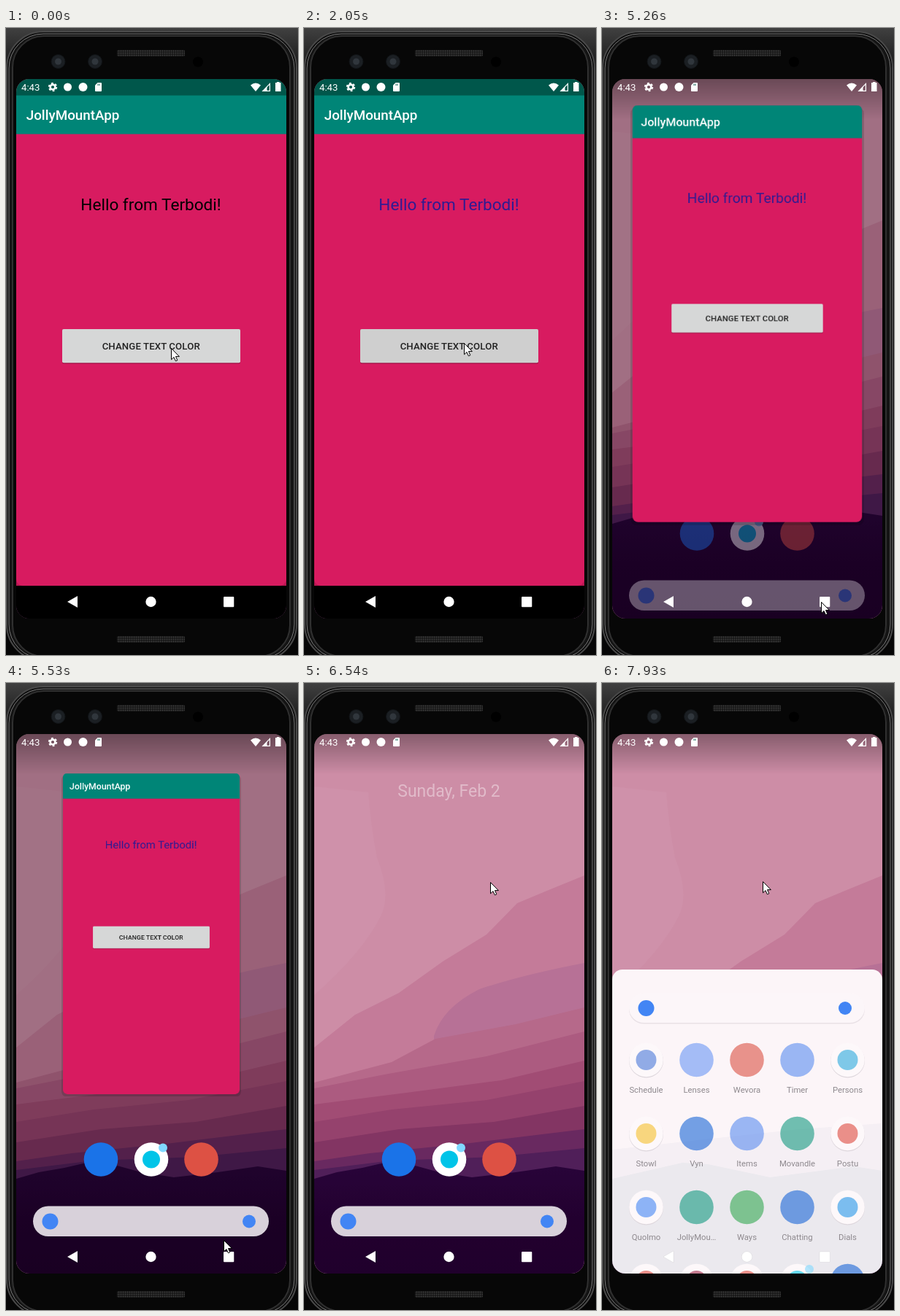
These frames come from a looping animation (400x860 px, 8000 ms). An HTML page:

```html
<!DOCTYPE html>
<html lang="en">
<head>
<meta charset="utf-8">
<title>Text color demo</title>
<style>
html, body { margin: 0; width: 100%; height: 100%; overflow: hidden; background: #000; }
svg { display: block; width: 400px; height: 860px; font-family: Roboto, sans-serif; }
.mid { text-anchor: middle; }
.bold { font-weight: 500; }

#cursor, #app, #greeting, #btn, #bars, #badge, #dim, #date, #dock, #drawer {
  animation: 8s step-end infinite;
}
#cursor { animation-name: cursor; }
#app { animation-name: app; }
#greeting { animation-name: greeting; }
#btn { animation-name: btn; }
#bars { animation-name: bars; }
#badge { animation-name: badge; }
#dim { animation-name: dim; }
#date { animation-name: date; }
#dock { animation-name: dock; }
#drawer { animation-name: drawer; }

@keyframes cursor {
  0% { transform: translate(226px, 439px); }
  17.125% { transform: translate(222px, 435px); }
  18.75% { transform: translate(219px, 432px); }
  52% { transform: translate(260px, 572px); }
  53.625% { transform: translate(311px, 761px); }
  55.5% { transform: translate(316px, 784px); }
  57% { transform: translate(319px, 796px); }
  58.875% { transform: translate(308px, 791px); }
  60.375% { transform: translate(300px, 787px); }
  67.25% { transform: translate(299px, 778px); }
  69.125% { transform: translate(298px, 764px); }
  70.875% { transform: translate(290px, 700px); }
  72.375% { transform: translate(277px, 592px); }
  73.875% { transform: translate(268px, 500px); }
  75.75% { transform: translate(264px, 430px); }
  77.25% { transform: translate(258px, 330px); }
  78.75% { transform: translate(255px, 273px); }
  83.625% { transform: translate(261px, 400px); }
  85.25% { transform: translate(267px, 524px); }
  87.125% { transform: translate(269px, 610px); }
  88.625% { transform: translate(266px, 672px); }
  90.5% { transform: translate(266px, 690px); }
  92% { transform: translate(265px, 697px); }
  93.875% { transform: translate(265px, 700px); }
  95.375% { transform: translate(264px, 702px); }
  97.25% { transform: translate(257px, 633px); }
  99.125%, 100% { transform: translate(220px, 272px); }
}
@keyframes app {
  0% { transform: translate(14px, 92.5px); }
  65.75% { transform: translate(41.7px, 106px) scale(.85); }
  67.25% { transform: translate(69.5px, 120px) scale(.7); }
  69.125% { transform: translate(78px, 124px) scale(.654); }
  75.75% { transform: translate(78px, 54px) scale(.654); }
  77.25% { transform: translate(78px, -46px) scale(.654); }
  78.75% { transform: translate(78px, -230px) scale(.654); }
  80.25%, 100% { transform: translate(78px, -500px) scale(.654); }
}
@keyframes greeting { 0% { fill: #000; } 24.125%, 100% { fill: #311b92; } }
@keyframes btn {
  0% { fill: #d6d7d7; }
  22.25% { fill: #cacaca; }
  24.125% { fill: #cdcdcd; }
  25.625% { fill: #cfcfcf; }
  52%, 100% { fill: #d6d7d7; }
}
@keyframes bars { 0% { opacity: 1; } 65.75%, 100% { opacity: 0; } }
@keyframes badge { 0% { opacity: 0; } 72.375% { opacity: .6; } 73.875%, 100% { opacity: 1; } }
@keyframes dim {
  0% { opacity: .34; }
  80.25% { opacity: .25; }
  81.75% { opacity: .16; }
  83.625% { opacity: .08; }
  85.25% { opacity: 0; }
  99.125%, 100% { opacity: .16; }
}
@keyframes date {
  0% { opacity: 0; transform: translateY(-6px); }
  80.25% { opacity: .15; transform: translateY(-5px); }
  81.75% { opacity: .4; transform: translateY(-3px); }
  83.625% { opacity: .75; transform: translateY(-1px); }
  85.25% { opacity: 1; transform: none; }
  99.125%, 100% { opacity: 0; transform: translateY(-40px); }
}
@keyframes dock {
  0% { opacity: .4; transform: translateY(40px); }
  67.25% { opacity: .8; transform: translateY(12px); }
  69.125%, 100% { opacity: 1; transform: none; }
}
@keyframes drawer { 0% { opacity: 0; } 99.125%, 100% { opacity: 1; } }
</style>
</head>
<body>
<svg viewBox="0 0 400 860">
  <defs>
    <clipPath id="screen"><rect x="14" y="70" width="370" height="740" rx="18"/></clipPath>
    <pattern id="mesh" width="3" height="3" patternUnits="userSpaceOnUse">
      <rect width="3" height="3" fill="#161616"/>
      <circle cx="1.5" cy="1.5" r="1" fill="#3c3c3c"/>
    </pattern>
    <linearGradient id="scrim" x2="0" y2="1">
      <stop stop-opacity=".34"/><stop offset="1" stop-opacity="0"/>
    </linearGradient>
    <linearGradient id="hills" x2="0" y2="1">
      <stop stop-color="#310545"/><stop offset=".5" stop-color="#290038"/><stop offset="1" stop-color="#260034"/>
    </linearGradient>
    <linearGradient id="edge" x2="0" y2="1">
      <stop stop-color="#404040"/><stop offset=".06" stop-color="#1a1a1a"/><stop offset="1" stop-color="#060606"/>
    </linearGradient>
  </defs>

  <!-- device body -->
  <rect width="400" height="860" fill="url(#edge)"/>
  <rect x="1" y="5" width="397" height="863" rx="50" fill="#0c0c0c" stroke="#4a4a4a" stroke-width="2"/>
  <rect x="4" y="8" width="391" height="857" rx="47" fill="#141414" stroke="#7a7a7a"/>
  <rect x="9" y="11" width="380" height="851" rx="43" fill="#070707" stroke="#303030" stroke-width="2"/>
  <g fill="#1b1f23" stroke="#111417">
    <circle cx="71.5" cy="46" r="9.5"/><circle cx="122" cy="46" r="9.5"/>
  </g>
  <g fill="#30363c">
    <circle cx="71.5" cy="46" r="4.5"/><circle cx="122" cy="46" r="4.5"/>
  </g>
  <circle cx="263" cy="46.5" r="7"/>
  <rect x="152" y="30" width="93" height="9" rx="2" fill="url(#mesh)"/>
  <rect x="152" y="834" width="93" height="9" rx="2" fill="url(#mesh)"/>

  <g clip-path="url(#screen)">
    <!-- wallpaper -->
    <rect x="14" y="70" width="370" height="740" fill="#f4a8c6"/>
    <path fill="#f6adca" d="M14 142 88 150Q92 200 100 240 120 290 105 320 80 370 14 428Z"/>
    <path fill="#e993b6" d="M14 500 70 455 130 425 190 382 250 345 292 302 335 284 384 264V600H14Z"/>
    <path fill="#da87b3" d="M178 484Q190 445 240 420 300 400 384 384V520H178Z"/>
    <path fill="#d97da4" d="M14 548 120 520 180 488 290 468 384 445V600H14Z"/>
    <path fill="#cd6c99" d="M14 556 110 537 250 512 384 478V620H14Z"/>
    <path fill="#c05b8a" d="M14 578 140 562 270 545 384 518V640H14Z"/>
    <path fill="#b24f82" d="M14 602 120 585 250 572 384 546V660H14Z"/>
    <path fill="#9c3f76" d="M14 630 130 612 260 602 384 580V680H14Z"/>
    <path fill="#7d3172" d="M14 656 90 645 220 632 384 612V690H14Z"/>
    <path fill="#5f256a" d="M14 668 120 655 260 650 384 638V690H14Z"/>
    <path fill="url(#hills)" d="M14 680 45 671 80 665 110 658 145 660 185 671 230 678 290 671 345 663 384 669V810H14Z"/>
    <rect id="dim" x="14" y="70" width="370" height="740"/>
    <rect x="14" y="70" width="370" height="55" fill="url(#scrim)"/>

    <text id="date" class="mid" x="198.5" y="159" font-size="23" fill="#fff">Sunday, Feb 2</text>

    <g id="dock">
      <circle cx="130" cy="653.5" r="23.3" fill="#1a73e8"/>
      <circle cx="199" cy="653.5" r="23.3" fill="#fff"/>
      <circle cx="199" cy="653.5" r="12" fill="#00c4e8"/>
      <circle cx="215" cy="637.5" r="6" fill="#80d8ff"/>
      <circle cx="267.5" cy="653.5" r="23.3" fill="#dd5144"/>
      <rect x="37" y="717.5" width="323" height="41.5" rx="20.75" fill="#d8d1da"/>
      <circle cx="60.5" cy="738.5" r="11" fill="#4285f4"/>
      <circle cx="333" cy="738.5" r="9" fill="#4285f4"/>
    </g>

    <!-- backdrop while the app fills the screen -->
    <g id="bars">
      <rect x="14" y="70" width="370" height="23" fill="#00574b"/>
      <rect x="14" y="92.5" width="370" height="53" fill="#008577"/>
      <rect x="14" y="700" width="370" height="65" fill="#d81b60"/>
      <rect x="14" y="765" width="370" height="45"/>
    </g>

    <g id="app">
      <rect x="-3" y="3" width="376" height="675" rx="10" opacity=".14"/>
      <rect width="370" height="672.5" rx="9" fill="#d81b60"/>
      <path fill="#008577" d="M0 53V9Q0 0 9 0H361Q370 0 370 9V53Z"/>
      <text class="bold" x="13.7" y="33.8" font-size="18.83" fill="#fff">JollyMountApp</text>
      <text id="greeting" class="mid" x="184.5" y="157.5" font-size="22.6">Hello from Terbodi!</text>
      <rect x="63" y="321.5" width="244" height="46.5" rx="2" opacity=".28"/>
      <rect id="btn" x="63" y="320.5" width="244" height="46.3" rx="2"/>
      <text class="mid bold" x="184.7" y="348.3" font-size="13.2" letter-spacing=".12" fill="#222">CHANGE TEXT COLOR</text>
      <circle id="badge" cx="185" cy="0" r="32" fill="#149a80"/>
    </g>

    <g id="drawer">
      <rect x="14" y="393" width="370" height="440" rx="14" fill="#fcf5f8"/>
      <path fill="#f5eff4" d="M14 640 140 626 270 612 384 604V810H14Z"/>
      <path fill="#ebe9ee" d="M14 680 110 658 145 660 230 678 345 663 384 669V810H14Z"/>
      <rect x="37" y="427" width="323" height="40.5" rx="20" fill="#e9e1e6"/>
      <rect x="37" y="425" width="323" height="41" rx="20.5" fill="#fcf6f9"/>
      <circle cx="60.5" cy="446" r="11" fill="#4285f4"/>
      <circle cx="333" cy="446" r="9" fill="#4285f4"/>
      <g id="grid" class="mid" font-size="11.3"></g>
    </g>

    <!-- status and navigation icons -->
    <g fill="#fff">
      <text x="21" y="86" font-size="13.2">4:43</text>
      <g fill="none" stroke="#fff">
        <circle cx="64" cy="81" r="3.4" stroke-width="2.6"/>
        <circle cx="64" cy="81" r="5.3" stroke-width="1.8" stroke-dasharray="2.8 2.75"/>
      </g>
      <circle cx="84.5" cy="81" r="5.5"/>
      <circle cx="105.5" cy="81" r="6"/>
      <path d="M125.5 75H130Q131 75 131 76V86Q131 87 130 87H123Q122 87 122 86V78.5Z"/>
      <path stroke="#00574b" stroke-width=".9" d="M126 76.5V79M128 76.5V79"/>
      <path d="M335 78.5Q342 72.5 349 78.5L342 87Z"/>
      <path fill="none" stroke="#fff" stroke-width="1.2" d="M351.8 86.3 361.4 76.5V86.3Z"/>
      <path d="M351 87 357.5 80.3V87Z"/>
      <path d="M371 75V74H374.5V75H376.5V87H369V75Z"/>
      <g stroke="#000" stroke-opacity=".07" stroke-width=".8">
        <path d="M84 787 98 779V795Z"/>
        <circle cx="198.5" cy="787" r="7.2"/>
        <rect x="298" y="780" width="14.3" height="14.3" rx="1"/>
      </g>
    </g>
  </g>

  <path id="cursor" fill="#fff" stroke="#000" d="M.5 .5V15.8L4 12.6 6.4 17.8 8.8 16.8 6.5 11.6H11.4Z"/>
</svg>
<script>
// label, colour, white plate behind the mark
const tiles = [
  ['Schedule', '#4a78d8', 1], ['Lenses', '#6c97f5'], ['Wevora', '#dd5144'], ['Timer', '#5b8df0'], ['Persons', '#29a8dc', 1],
  ['Stowl', '#f5c02c', 1], ['Vyn', '#1a66d8'], ['Items', '#5a8cf0'], ['Movandle', '#149a80'], ['Postu', '#dd4a3e', 1],
  ['Quolmo', '#4285f4', 1], ['JollyMou…', '#149a80'], ['Ways', '#34a853'], ['Chatting', '#1a66d8'], ['Dials', '#2596e8', 1],
  ['', '#dd4a3e', 1], ['', '#a02848', 1], ['', '#dd4a3e', 1], ['', '#00c4e8', 1], ['', '#1a66d8']
];
const disc = (x, y, r, fill, extra = '') => `<circle cx="${x}" cy="${y}" r="${r}" fill="${fill}" ${extra}/>`;
const faded = 'opacity=".6"';
document.getElementById('grid').innerHTML = tiles.map(([label, fill, plate], i) => {
  const x = 60.5 + i % 5 * 69, y = 517 + Math.floor(i / 5) * 101;
  const icon = plate
    ? disc(x, y + 1, 23.5, '#ddd6dc') + disc(x, y, 23.3, '#fdf8fa') + disc(x, y, 14, fill, faded)
    : disc(x, y, 23.3, fill, faded);
  return icon + `<text x="${x}" y="${y + 45}" fill="#8e898e">${label}</text>`;
}).join('') + disc(284, 804, 6, '#80d8ff', faded);
</script>
</body>
</html>
```
